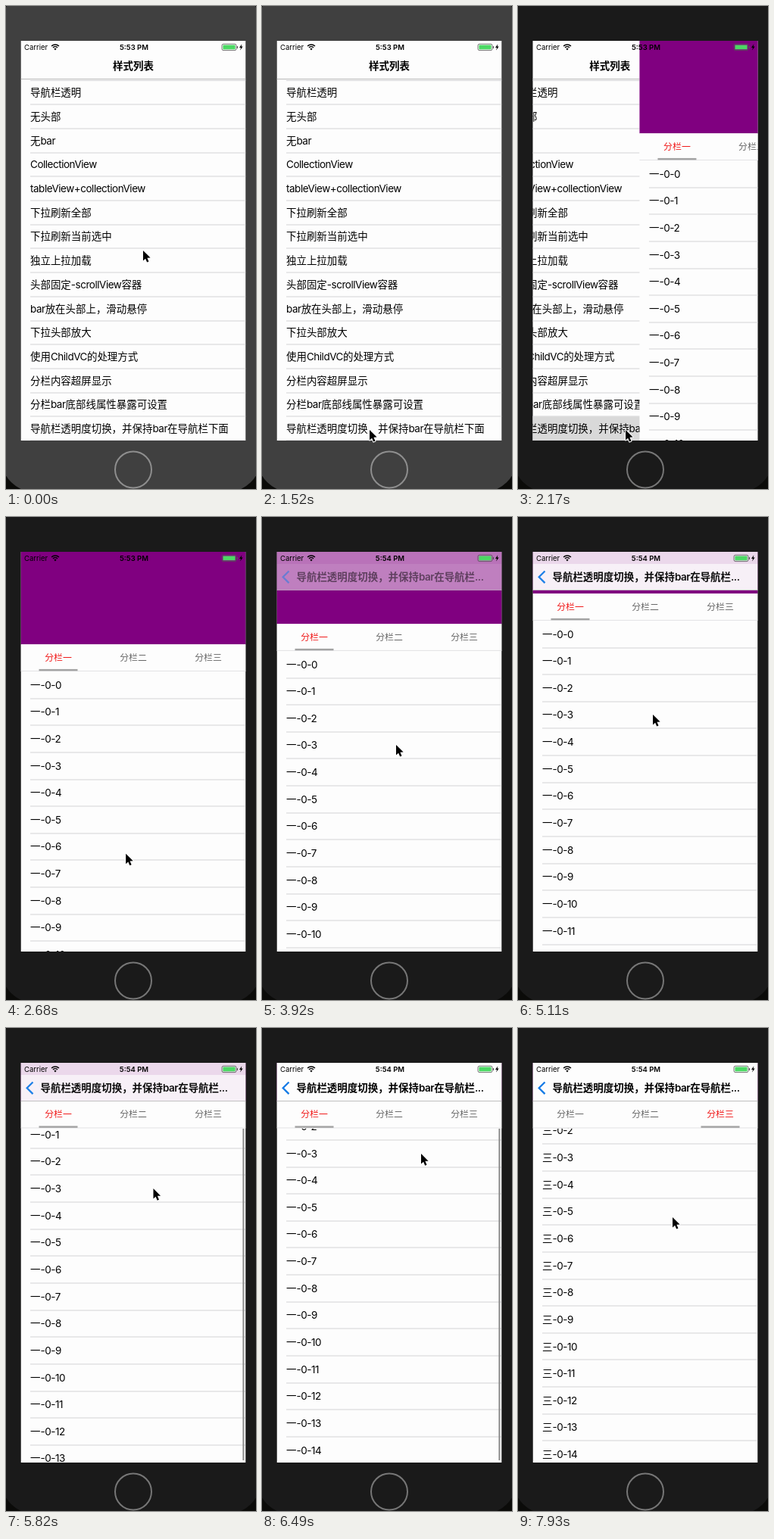
An HTML page with a canvas that plays this animation: 330 by 638 pixels, repeating every 7.99 s.

```html
<!DOCTYPE html>
<html lang="zh-CN">
<head>
<meta charset="utf-8">
<style>
html, body { margin: 0; width: 100%; height: 100%; overflow: hidden; background: #1a1a1a; }
canvas { display: block; }
</style>
</head>
<body>
<canvas id="stage" width="330" height="638"></canvas>
<script>
const ctx = document.getElementById('stage').getContext('2d');
const LOOP = 7990;
const LEFT = 19.5, TOP = 46, W = 297, H = 528, RIGHT = LEFT + W;
const NAV = 96.8, MENU_ROW = 31.68, ROW = 35.64, HEADER = 168.3;
const PURPLE = '#800080', LINE = '#d3d3d6', PAPER = '#fdfdfd';
const FONTS = 'Inter, "Noto Sans CJK SC", "Noto Sans CJK JP", sans-serif';

const menu = ['导航栏透明', '无头部', '无bar', 'CollectionView', 'tableView+collectionView',
  '下拉刷新全部', '下拉刷新当前选中', '独立上拉加载', '头部固定-scrollView容器',
  'bar放在头部上，滑动悬停', '下拉头部放大', '使用ChildVC的处理方式', '分栏内容超屏显示',
  '分栏bar底部线属性暴露可设置', '导航栏透明度切换，并保持bar在导航栏下面'];
const numerals = ['一', '二', '三'];

// Keyframes: [time, value, ...], straight lines between them
const pointer = [[0, 181, 323], [60, 179, 324], [240, 179, 325], [420, 179, 325], [600, 176, 360],
  [850, 150, 495], [1000, 140.5, 539], [1110, 140.5, 539], [1520, 142, 560], [2560, 142, 560],
  [2680, 158, 446], [2740, 168, 367], [2800, 172, 352], [2860, 174, 346], [2980, 174, 346],
  [3100, 173, 339], [3400, 173, 339], [3920, 177, 301], [5110, 178, 261], [6490, 210, 166],
  [6730, 211, 172], [6940, 211, 172], [7250, 267, 124], [7750, 267, 124], [7930, 204, 250]];
const scrollKeys = [[3460, 0], [3920, 27], [5110, 67], [6490, 163], [6730, 157.5]];
const navKeys = [[3400, 0], [3920, .5], [5020, .95], [5870, .95], [5930, 1]];

function track(keys, t) {
  const i = keys.findIndex(k => k[0] > t);
  if (i < 0) return keys.at(-1).slice(1);
  if (i === 0) return keys[0].slice(1);
  const [a, b] = [keys[i - 1], keys[i]];
  const f = (t - a[0]) / (b[0] - a[0]);
  return a.slice(1).map((v, n) => v + (b[n + 1] - v) * f);
}
const progress = (t, start, length) => Math.min(1, Math.max(0, (t - start) / length));
const easeOut = f => 1 - (1 - f) ** 3;
const easeInOut = f => f * f * (3 - 2 * f);

function rect(x, y, w, h, color) {
  ctx.fillStyle = color;
  ctx.fillRect(x, y, w, h);
}

function path(points, closed) {
  ctx.beginPath();
  points.forEach(([x, y]) => ctx.lineTo(x, y));
  if (closed) ctx.closePath();
}

// Latin runs are set slightly tighter than Chinese ones
function text(str, x, y, { size = 13.46, weight = 400, color = '#000', center = false, tight = -.45 } = {}) {
  ctx.font = `${weight} ${size}px ${FONTS}`;
  ctx.fillStyle = color;
  const runs = str.match(/[ -~]+|[^ -~]+/g).map(run => {
    const spacing = (/[ -~]/.test(run) ? tight : 0) + 'px';
    ctx.letterSpacing = spacing;
    return { run, spacing, width: ctx.measureText(run).width };
  });
  if (center) x -= runs.reduce((sum, r) => sum + r.width, 0) / 2;
  for (const r of runs) {
    ctx.letterSpacing = r.spacing;
    ctx.fillText(r.run, x, y + size * .36);
    x += r.width;
  }
}

function clipped(x, y, w, h, draw) {
  ctx.save();
  ctx.beginPath();
  ctx.rect(x, y, w, h);
  ctx.clip();
  draw();
  ctx.restore();
}

function drawPhone(active) {
  rect(0, 0, 330, 638, '#0b0b09');
  ctx.fillStyle = active ? '#1a1a1a' : '#404040';
  ctx.beginPath();
  ctx.roundRect(-6, -20, 342, 662, 44);
  ctx.fill();
  ctx.strokeStyle = active ? '#767676' : '#8e8e8e';
  ctx.lineWidth = 2;
  ctx.beginPath();
  ctx.arc(168, 612.5, 24, 0, 7);
  ctx.stroke();
}

function drawMenu(pressed) {
  rect(LEFT, TOP, W, H, PAPER);
  rect(32, 98, RIGHT - 32, 1, LINE);
  menu.forEach((label, i) => {
    const y = 98.7 + i * MENU_ROW;
    if (pressed && i === menu.length - 1) rect(LEFT, y, W, MENU_ROW, '#d9d9d9');
    text(label, 32, y + MENU_ROW / 2);
    rect(32, Math.round(y + MENU_ROW) - .5, RIGHT - 32, 1, LINE);
  });
  rect(LEFT, 96, W, 1, '#b8b8b8');
  text('样式列表', 168, 79.5, { weight: 600, center: true });
}

function drawRows(numeral, x, top, offset) {
  for (let i = 0; i < 20; i++) {
    const y = top + i * ROW - offset;
    text(`${numeral}-0-${i}`, x + 12.5, y + ROW / 2);
    rect(x + 12.5, Math.round(y + ROW) - .5, W - 12.5, 1, LINE);
  }
}

function drawTabs(y, page) {
  rect(LEFT, y, W, ROW, PAPER);
  numerals.forEach((n, i) => text('分栏' + n, 69 + 99 * i, y + 17.2,
    { size: 11.9, center: true, color: Math.round(page) === i ? '#f01818' : '#666' }));
  rect(LEFT, y + ROW - 1, W, 1, '#e2e2e4');
  rect(43.5 + 99 * page, y + 32.6, 51, 2.4, '#a3a3a3');
}

function drawNav(alpha) {
  if (!alpha) return;
  const status = alpha < 1 ? alpha * .9 : 1;
  rect(LEFT, TOP, W, 16, `rgba(253,253,253,${status})`);
  rect(LEFT, TOP + 16, W, NAV - TOP - 16, `rgba(253,253,253,${alpha})`);
  ctx.globalAlpha = alpha;
  rect(LEFT, 96, W, 1, '#c0c0c0');
  ctx.strokeStyle = '#147be6';
  ctx.lineWidth = 2.3;
  path([[35.5, 71.5], [27.7, 79.3], [35.5, 87.1]]);
  ctx.stroke();
  text('导航栏透明度切换，并保持bar在导航栏...', 45.5, 79.5, { weight: 600 });
  ctx.globalAlpha = 1;
}

function drawDetail(t) {
  const [scroll] = track(scrollKeys, t);
  const tabTop = Math.max(NAV, HEADER - scroll);
  const offset = Math.max(0, scroll - (HEADER - NAV));
  const listTop = tabTop + ROW;
  const page = 2 * easeInOut(progress(t, 7300, 380));
  rect(LEFT, TOP, W, H, PAPER);
  rect(LEFT, TOP, W, tabTop - TOP, PURPLE);
  clipped(LEFT, listTop, W, TOP + H - listTop, () => {
    numerals.forEach((n, i) => {
      if (Math.abs(i - page) < 1) drawRows(n, LEFT + (i - page) * W, listTop, offset);
    });
    if (t > 5600 && t < 6730) rect(312.4, 133, 2, 438, '#8c8c8c');
  });
  drawTabs(tabTop, page);
  drawNav(track(navKeys, t)[0]);
}

function drawStatus(t) {
  text('Carrier', 24, 54.3, { size: 9.5, tight: 0 });
  text(t < 3460 ? '5:53 PM' : '5:54 PM', 169, 54.3, { size: 9.5, weight: 600, center: true, tight: 0 });
  ctx.strokeStyle = '#000';
  ctx.lineWidth = 1.5;
  for (const r of [4.2, 7]) {
    ctx.beginPath();
    ctx.arc(65, 58, r, -2.35, -.79);
    ctx.stroke();
  }
  ctx.fillStyle = '#000';
  ctx.beginPath();
  ctx.moveTo(65, 58.6);
  ctx.arc(65, 58.2, 2.3, -2.35, -.79);
  ctx.fill();
  ctx.strokeStyle = '#555';
  ctx.lineWidth = .8;
  ctx.beginPath();
  ctx.roundRect(285, 50.2, 19, 8.4, 2);
  ctx.stroke();
  rect(304.8, 53, 1.2, 3, '#555');
  rect(286.4, 51.5, 16.2, 5.8, '#4cd964');
  ctx.fillStyle = '#000';
  path([[311.3, 50.3], [308, 55], [310, 55], [309.2, 58.6], [312.6, 53.6], [310.6, 53.6]], true);
  ctx.fill();
}

function drawPointer(x, y) {
  ctx.save();
  ctx.translate(x, y);
  path([[0, 0], [0, 13.5], [3.1, 10.7], [5.2, 15.6], [7.5, 14.6], [5.4, 9.8], [9.6, 9.6]], true);
  ctx.strokeStyle = '#fff';
  ctx.lineWidth = 2;
  ctx.lineJoin = 'round';
  ctx.stroke();
  ctx.fillStyle = '#000';
  ctx.fill();
  ctx.restore();
}

function shifted(dx, draw) {
  ctx.save();
  ctx.translate(dx, 0);
  draw();
  ctx.restore();
}

function frame(now) {
  const t = now % LOOP;
  const push = easeOut(progress(t, 2050, 550));
  drawPhone(t >= 1990);
  clipped(LEFT, TOP, W, H, () => {
    if (push < 1) shifted(-.3 * W * push, () => drawMenu(t >= 1990));
    if (push > 0) shifted(W * (1 - push), () => drawDetail(t));
    drawStatus(t);
  });
  drawPointer(...track(pointer, t));
  requestAnimationFrame(frame);
}
requestAnimationFrame(frame);
</script>
</body>
</html>
```
